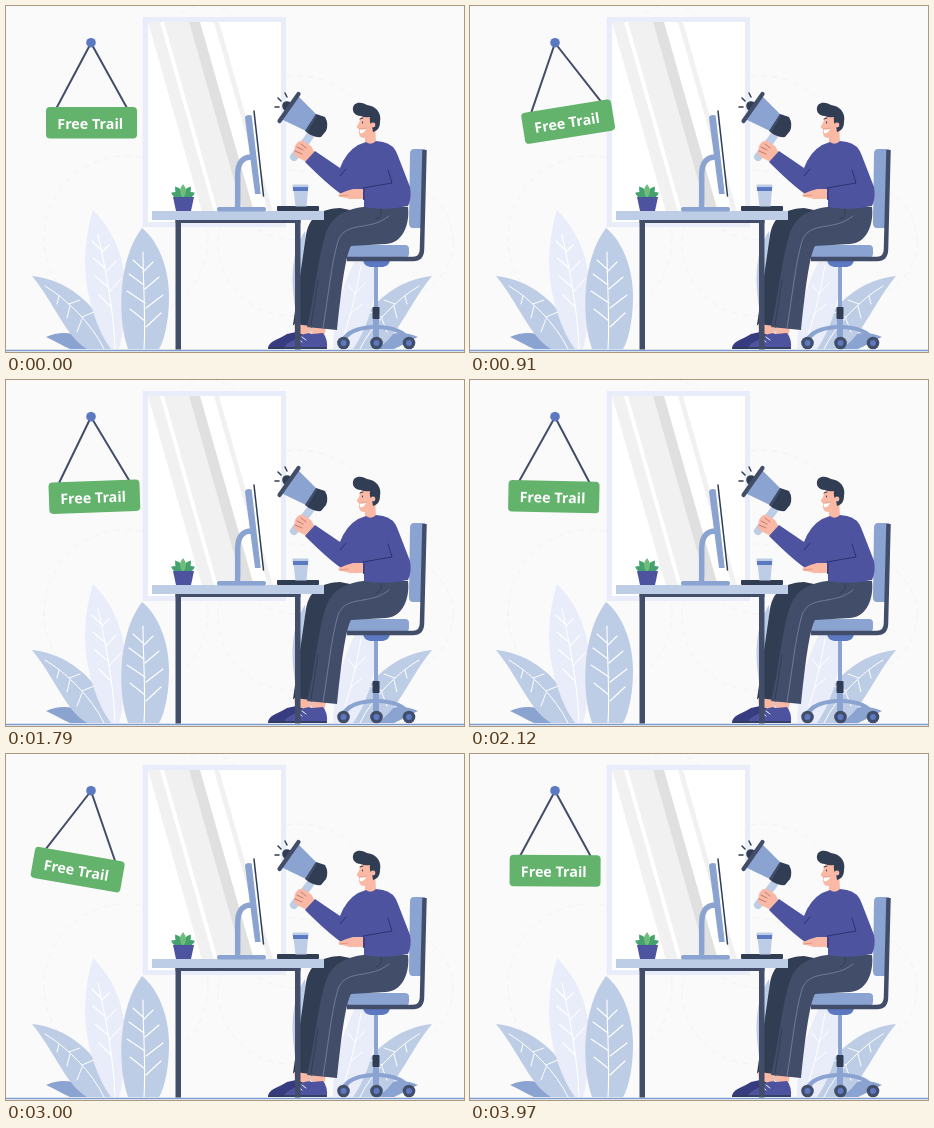
Animation of 458 by 346 pixels, one loop 4000 ms. Source, as an HTML page with a canvas:

```html
<!DOCTYPE html>
<html lang="en">
<head>
<meta charset="utf-8">
<title>Office scene with swinging sign</title>
<style>
html, body { margin: 0; width: 100%; height: 100%; overflow: hidden; background: #fafafa; }
canvas { display: block; width: 458px; height: 346px; }
</style>
</head>
<body>
<canvas id="stage"></canvas>
<script>
const W = 458, H = 346, LOOP = 4000, SWING = 10;
const canvas = document.getElementById('stage');
const ratio = window.devicePixelRatio || 1;
const scene = document.createElement('canvas');
for (const c of [canvas, scene]) {
  c.width = Math.round(W * ratio);
  c.height = Math.round(H * ratio);
}
const view = canvas.getContext('2d');
let g = scene.getContext('2d');
g.scale(ratio, ratio);

const navy = '#424e69', ink = '#303d53', blue = '#8ba3d0', sky = '#becde6',
  pale = '#e9edf9', violet = '#4d539f', royal = '#5b78c1', skin = '#f9b9a5', green = '#64b36d';

function fill(color, d) {
  g.fillStyle = color;
  g.fill(new Path2D(d));
}
function line(color, width, d, cap = 'round') {
  g.strokeStyle = color;
  g.lineWidth = width;
  g.lineCap = cap;
  g.lineJoin = 'round';
  g.stroke(new Path2D(d));
}
function box(color, x, y, w, h, r = 0) {
  g.fillStyle = color;
  g.beginPath();
  g.roundRect(x, y, w, h, r);
  g.fill();
}
function dot(color, x, y, r) {
  g.fillStyle = color;
  g.beginPath();
  g.arc(x, y, r, 0, 7);
  g.fill();
}

function rings() {
  g.setLineDash([6, 5]);
  g.strokeStyle = '#f3f3f5';
  g.lineWidth = 1;
  for (const [x, y, r] of [[120, 232, 82], [292, 152, 82], [285, 237, 73], [390, 235, 57], [200, 40, 41]]) {
    g.beginPath();
    g.arc(x, y, r, 0, 7);
    g.stroke();
  }
  g.setLineDash([]);
}

function mirrored(draw) {
  g.save();
  g.translate(452, 0);
  g.scale(-1, 1);
  draw();
  g.restore();
}

function sideLeaves() {
  fill(blue, 'M40 331C59 322 79 329 96 343H64C55 339 49 335 40 331Z');
  fill(sky, 'M26 270C57 273 94 295 107 343H81C60 331 49 298 26 270Z');
  line('#fff', 1, 'M39 280C61 293 86 318 98 343M53 290L51 298M64 300L61 312M76 313L71 326M63 298L74 294M76 311L88 306');
}

function tallLeaf() {
  fill(pale, 'M87 204C100 217 119 243 119 282C119 308 117 329 113 343H105C92 326 79 291 79 256C79 235 83 218 87 204Z');
  line('#fff', 1.1, 'M92 229C99 260 108 308 109 343M95 244L86 235M99 262L87 252M102 281L89 270M105 301L93 289M96 246L103 239M100 266L110 255M103 286L115 273');
}

function plants() {
  sideLeaves();
  mirrored(sideLeaves);
  tallLeaf();
  fill(sky, 'M136 222C152 235 163 261 163 291C163 315 158 335 153 343H122C111 312 112 253 136 222Z');
  line('#fff', 1.1, 'M137 246C137 276 140 313 138 343M137 263L127 254M138 279L123 268M139 297L121 285M139 315L124 303M138 265L147 256M139 283L153 271M140 302L157 289M140 321L155 307');
  fill(sky, 'M299 225C287 243 283 270 290 307L308 330Z');
  fill(pale, 'M360 237C379 267 366 316 347 343H327C327 304 341 263 360 237Z');
  line('#fff', 1, 'M355 259C350 290 342 318 334 343M349 288L359 277M344 308L356 298M349 288L342 279');
}

function windowPane() {
  box(pale, 136.5, 11, 143.5, 210);
  box('#fff', 142, 16, 133, 200);
  g.save();
  g.beginPath();
  g.rect(142, 16, 133, 190);
  g.clip();
  const slope = 54;
  for (const [color, x, w] of [['#f1f1f1', 142, 12], ['#f1f1f1', 158, 25], ['#e0e0e0', 183, 11], ['#f1f1f1', 208, 5]])
    fill(color, `M${x} 16h${w}l${slope} 190h${-w}Z`);
  g.restore();
}

function chair() {
  line(blue, 4, 'M370 259V306', 'butt');
  box(ink, 366.5, 301, 7, 12, 1);
  fill(blue, 'M367 313H373V319C390 320 401 325 405 334H400C394 326 386 324 373 323V334H367V323C354 324 346 326 340 334H335C339 325 350 320 367 319Z');
  for (const x of [337.5, 370.5, 403]) {
    dot(navy, x, 337, 6.3);
    dot(royal, x, 337, 3);
  }
  fill(royal, 'M357 254H384C383 259 380 261 375 261H366C361 261 358 259 357 254Z');
  box(blue, 330, 239, 73, 12.5, 4);
  fill(blue, 'M408 143H419L416 222H407Q403 222 403 217L404 148Q404 143 408 143Z');
  line(navy, 4.5, 'M418.5 144L416 243Q416 253 407 253H341', 'butt');
}

function megaphone() {
  line(sky, 8, 'M304 130L288 151');
  dot(ink, 281, 100, 4.8);
  line(ink, 1.5, 'M281 91L279 87M275 95L272 92M273 101L269 101');
  fill(blue, 'M275 113L292 90L311 109L300 125Z');
  line(navy, 4.2, 'M273.5 115L292.5 88');
  fill(ink, 'M310 108L319 111Q323 118 320 125L315 131Q307 132 299 125Z');
  line(navy, 2, 'M310 110L301 125');
}

function legs() {
  fill(ink, 'M334 202C317 203 304 208 300 229L287 319L308 322L326 239L369 209Z');
  fill(skin, 'M288 318L305 320L304 331L289 330ZM306 321L320 322L318 331H306Z');
  fill('#373c80', 'M262 343C262 335 272 334 281 328L290 326L301 330L304 343Z');
  fill(violet, 'M278 343C279 336 289 335 296 329Q302 326 306 328L317 327Q322 333 321 343Z');
  line(ink, 1.6, 'M263 342H320');
  line(pale, 1, 'M296 331L300 334M292 333L296 336');
  fill(navy, 'M357 201H402C404 216 398 237 380 238L345 240C339 251 335 286 331 324L301 321C309 291 313 238 323 220C331 207 343 203 357 201Z');
  line('#7c87a2', 0.8, 'M383 210C364 226 340 214 332 235C325 259 322 293 317 322');
  line(ink, 1, 'M375 203Q377 211 370 213M312 275L305 319');
}

function head() {
  fill(skin, 'M359 122L369 117L370 137Q364 141 359 136Z');
  fill(skin, 'M356 108Q354 113 353 117L350.5 121L353 123Q352 132 358 132Q366 131 370 121L369 109Z');
  fill(ink, 'M355 110C348 110 345 104 348 99C352 95 358 97 361 99C370 100 376 107 374 116C374 122 371 125 367 126L366 120Q363 116 364 111Q359 112 355 110Z');
  dot(skin, 367, 119, 2.4);
  fill('#fff', 'M353.5 123L360 123Q358 128 354 127Z');
  line(ink, 1, 'M354 113L357 112M356.5 116V117');
  line('#e78f83', 0.8, 'M353 123Q357 124 360 122');
}

function torso() {
  fill(skin, 'M289 140Q292 134 297 135L305 140L309 147L302 157L295 153Q288 151 288 146Z');
  line('#b9716a', 0.9, 'M291 141L297 144M289 145L296 148M295 138L300 142');
  fill(violet, 'M309 145L334 162Q340 146 352 139L360 136Q365 140 370 135L377 136Q388 138 392 150L404 181Q406 192 402 200Q379 205 358 201V184Q345 191 335 188Q321 178 299 156Z');
  fill(skin, 'M359 183L347 183Q339 185 333 188Q331 191 336 191L344 193L358 193Z');
  line('#d98b7d', 0.8, 'M334 190L342 189');
  fill(violet, 'M357 182L386 177L391 158L404 183Q405 190 398 192L357 194Z');
  line('#2d326f', 1, 'M357 182L386 177L382 164M358 183V193M340 163L334 170');
}

function monitor() {
  box(blue, 211, 201, 49, 4.5, 2);
  line(blue, 5.5, 'M246 151C236 151 231.7 157 231.7 169V203', 'butt');
  fill(blue, 'M239 112Q239 109 243 109L248 110L255 188L249 188Z');
  line('#fff', 2, 'M246.5 108L256 190', 'butt');
  line(ink, 1.5, 'M248 105L257.5 190');
}

function pottedPlant() {
  for (const [turn, size] of [[-1.15, 13], [1.15, 13], [-0.6, 14], [0.6, 14], [0, 14]]) {
    g.save();
    g.translate(177, 192);
    g.rotate(turn);
    fill(turn ? '#43a26d' : '#70bc7b', `M0 0Q-6 ${-size / 2} 0 ${-size}Q6 ${-size / 2} 0 0Z`);
    g.restore();
  }
  fill(violet, 'M167 191H188L185 205H170Z');
}

function deskItems() {
  box(ink, 271, 200, 42, 5, 1);
  fill(sky, 'M287.5 184H302L300.5 200.5H289.5Z');
  box(sky, 286.5, 178.5, 16, 4, 1);
  box(royal, 287, 181, 15, 4);
}

function desk() {
  box(navy, 169.5, 213.5, 125, 3.5);
  box(navy, 169.5, 213.5, 5.5, 130);
  box(navy, 289, 213.5, 5.5, 130);
  box(sky, 146, 205, 172, 9);
}

function drawScene() {
  g.fillStyle = '#fafafa';
  g.fillRect(0, 0, W, H);
  rings();
  windowPane();
  plants();
  chair();
  box('#7e9bce', 0, 343.7, W, 1.6);
  legs();
  desk();
  pottedPlant();
  monitor();
  deskItems();
  head();
  megaphone();
  torso();
}

function drawSign(angle) {
  g.save();
  g.translate(85, 37);
  g.rotate(-angle * Math.PI / 180);
  line(navy, 2, 'M-34.5 65L0 0L36 65');
  box(green, -45, 64, 91, 31.5, 4);
  g.fillStyle = '#fff';
  g.font = '700 14.3px "Open Sans", "Noto Sans", sans-serif';
  g.textAlign = 'center';
  g.fillText('Free Trail', -0.8, 85.8);
  g.restore();
  dot(royal, 85, 36.7, 4.8);
}

// Constant-speed swing: right, back through the middle, left, home.
function swing(t) {
  const p = t % LOOP / LOOP * 4;
  return SWING * (p < 1 ? p : p < 3 ? 2 - p : p - 4);
}

drawScene();
g = view;
const start = performance.now();

function frame(now) {
  g.setTransform(1, 0, 0, 1, 0, 0);
  g.drawImage(scene, 0, 0);
  g.scale(ratio, ratio);
  drawSign(swing(Math.max(0, now - start)));
  requestAnimationFrame(frame);
}
frame(start);
</script>
</body>
</html>
```
